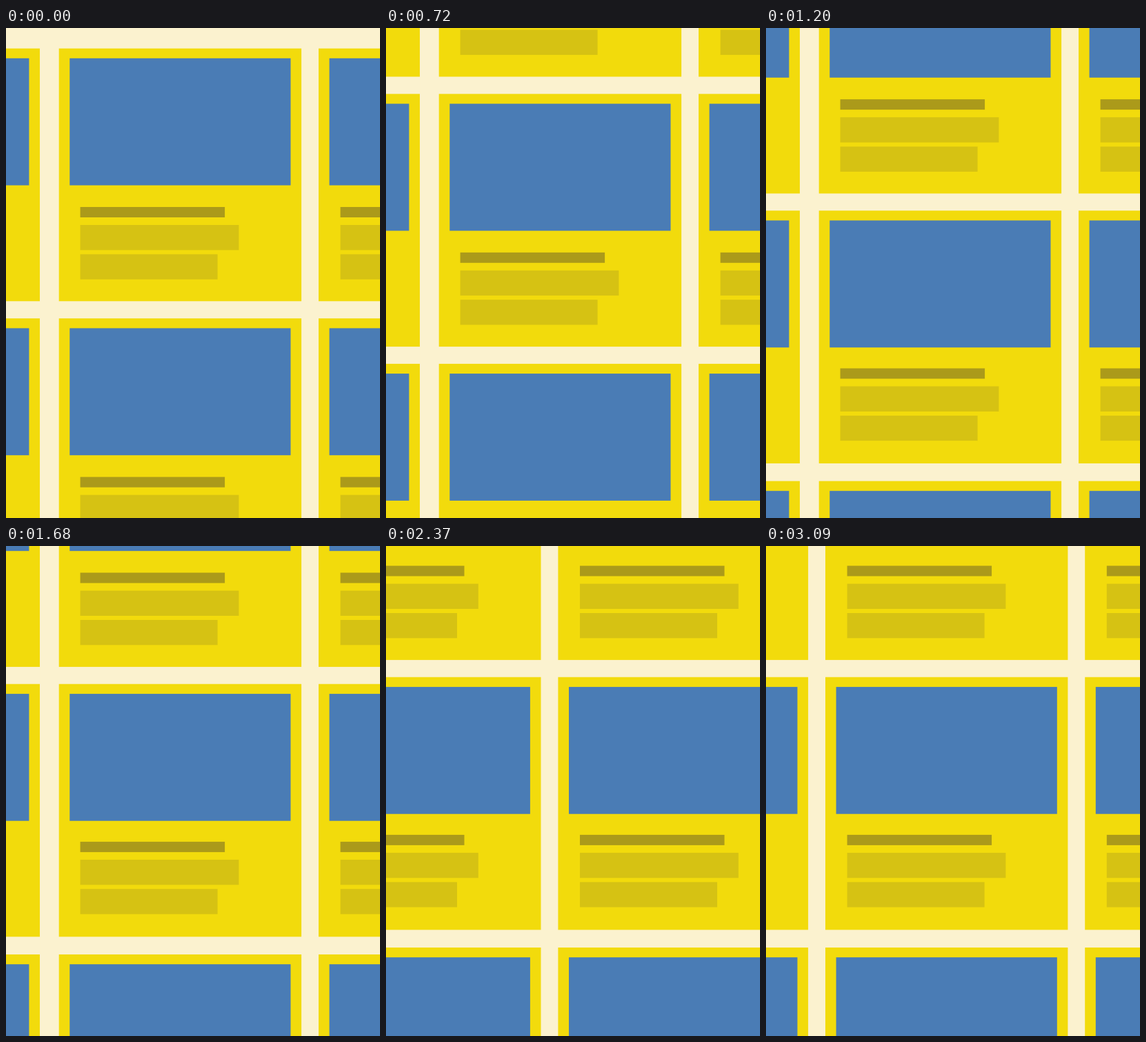
An HTML page with a canvas for the animation above (3870 ms loop, 542 by 709 pixels).

```html
<!DOCTYPE html>
<html lang="en">
<head>
<meta charset="utf-8">
<title>Card grid scroll</title>
<style>
  html, body { margin: 0; width: 100%; height: 100%; overflow: hidden; background: #fbf2cf; }
  canvas { display: block; }
</style>
</head>
<body>
<canvas id="stage" width="542" height="709"></canvas>
<script>
const ctx = document.getElementById('stage').getContext('2d');
const LOOP = 3870, STEP = 30, LAST_MOVE = 3090;
const columns = [-302.4, 76.7, 453, 829.2];
const rows = [29.6, 420.2, 810.7, 1202];

function rect(color, x, y, w, h) {
  ctx.fillStyle = color;
  ctx.fillRect(x, y, w, h);
}

function easeOut(t, start, duration, power) {
  const u = Math.min(1, Math.max(0, (t - start) / duration));
  return 1 - (1 - u) ** power;
}

function drawCard(x, y, textX, textY) {
  rect('#f2db0c', x, y, 351.4, 365.7);
  rect('#4a7cb5', x + 15.6, y + 14.2, 320.2, 183.8);
  rect('#ab9a1a', x + textX, y + textY, 209.5, 15);
  rect('#d6c213', x + textX, y + textY + 26, 229.8, 36.4);
  rect('#d6c213', x + textX, y + textY + 68.4, 199, 36.3);
}

function draw(now) {
  // Advance in 30 ms steps and rest after the last move
  const step = Math.floor((now % LOOP + 0.5) / STEP) * STEP;
  const t = Math.min(step, LAST_MOVE);
  const scrollX = 368.2 * easeOut(t, 2143, 1245, 4);
  const scrollY = 621 * easeOut(t, 394, 2127, 4.45);

  rect('#fbf2cf', 0, 0, 542, 709);
  columns.forEach((x, col) => rows.forEach((y, row) =>
    drawCard(x - scrollX, y - scrollY, col < 2 ? 30.9 : 31.6, row < 2 ? 229.4 : 228.2)));
  requestAnimationFrame(draw);
}

draw(0);
</script>
</body>
</html>
```
